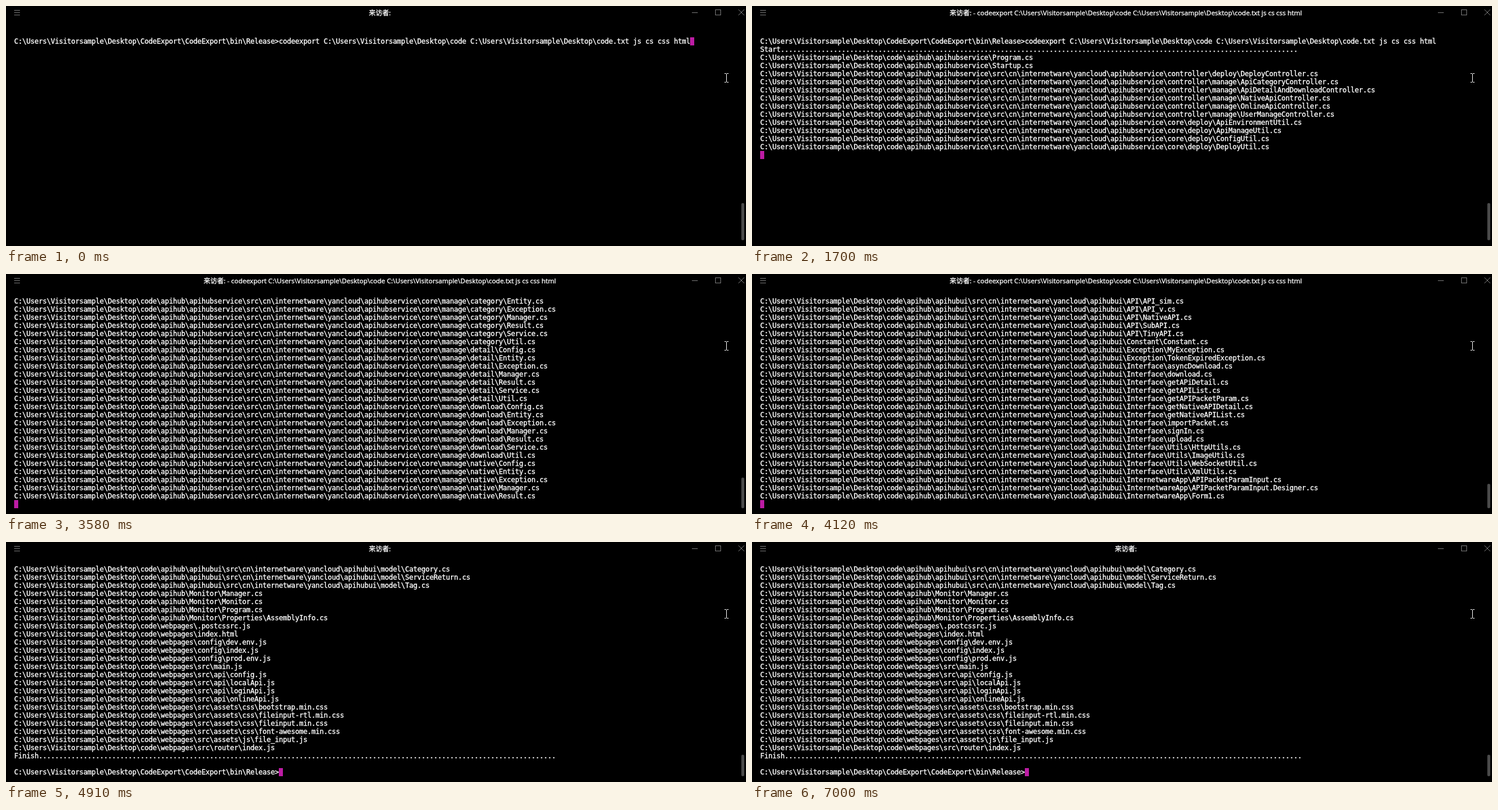
An HTML page with a canvas that plays this animation: 1272 px wide and 414 px high, repeating every 7.05 s.

```html
<!DOCTYPE html>
<html lang="zh">
<head>
<meta charset="utf-8">
<title>codeexport</title>
<style>
  html, body { margin: 0; width: 100%; height: 100%; overflow: hidden; background: #000; }
  canvas { display: block; }
</style>
</head>
<body>
<canvas id="screen" width="1272" height="414"></canvas>
<script>
const LOOP = 7050, ROWS = 26, ROW_H = 14, CHAR_W = 7, LEFT = 14, TOP = 40;
const TEXT = '#fff', ICON = '#7a7a7a', CURSOR = '#bd1ca4', THUMB = '#4a4a4a';
const ctx = document.getElementById('screen').getContext('2d');

// Paths are written with "/" and shown with "\".
const desktop = 'C:/Users/Visitorsample/Desktop/';
const prompt = desktop + 'CodeExport/CodeExport/bin/Release>';
const command = `codeexport ${desktop}code ${desktop}code.txt js cs css html`;
const files = (dir, names, ext = '.cs') =>
  names.split(' ').map(name => `${desktop}code/${dir}/${name}${ext}`);

const service = 'apihub/apihubservice';
const serviceSrc = service + '/src/cn/internetware/yancloud/apihubservice';
const core = serviceSrc + '/core';
const ui = 'apihub/apihubui';
const uiSrc = ui + '/src/cn/internetware/yancloud/apihubui';
const apiNames = 'API API_sim API_v NativeAPI SubAPI TinyAPI';
const web = 'webpages';

const lines = [
  '',
  prompt + command,
  'Start' + '.'.repeat(127),
  ...files(service, 'Program Startup'),
  ...files(serviceSrc + '/controller/deploy', 'DeployController'),
  ...files(serviceSrc + '/controller/manage', 'ApiCategoryController ApiDetailAndDownloadController ' +
    'NativeApiController OnlineApiController UserManageController'),
  ...files(core + '/deploy', 'ApiEnvironmentUtil ApiManageUtil ConfigUtil DeployUtil Result SystemUtil'),
  ...files(core + '/deploy/config', 'Config'),
  ...files(core + '/deploy/entity', 'DeployConfig'),
  ...files(core + '/deploy/exception', 'ApiEnvironmentNotFoundException ApiRunMesLostException ' +
    'FileProcessException GetDaasHttpsCertException NetworkException'),
  ...files(core + '/manage/API', apiNames),
  ...['category', 'detail', 'download', 'native', 'online', 'user'].flatMap(part =>
    files(`${core}/manage/${part}`, 'Config Entity Exception Manager Result Service Util')),
  ...files(ui, 'Program'),
  ...files(ui + '/Properties', 'AssemblyInfo Resources.Designer Settings.Designer'),
  ...files(uiSrc + '/API', apiNames),
  ...files(uiSrc + '/Constant', 'Constant'),
  ...files(uiSrc + '/Exception', 'MyException TokenExpiredException'),
  ...files(uiSrc + '/Interface', 'asyncDownload download getAPiDetail getAPIList getAPIPacketParam ' +
    'getNativeAPIDetail getNativeAPIList importPacket signIn upload'),
  ...files(uiSrc + '/Interface/Utils', 'HttpUtils ImageUtils WebSocketUtil XmlUtils'),
  ...files(uiSrc + '/InternetwareApp', 'APIPacketParamInput APIPacketParamInput.Designer ' +
    'Form1 Form1.Designer Login Login.Designer'),
  ...files(uiSrc + '/model', 'ApiDetail ApiList Category ServiceReturn Tag'),
  ...files('apihub/Monitor', 'Manager Monitor Program'),
  ...files('apihub/Monitor/Properties', 'AssemblyInfo'),
  ...files(web, '.postcssrc.js index.html', ''),
  ...files(web + '/config', 'dev.env index prod.env', '.js'),
  ...files(web + '/src', 'main', '.js'),
  ...files(web + '/src/api', 'config localApi loginApi onlineApi', '.js'),
  ...files(web + '/src/assets/css', 'bootstrap fileinput-rtl fileinput font-awesome', '.min.css'),
  ...files(web + '/src/assets/js', 'file_input', '.js'),
  ...files(web + '/src/router', 'index', '.js'),
  'Finish' + '.'.repeat(127),
  '',
  prompt
].map(line => line.replaceAll('/', '\\'));

// Bursts of output: start ms, step ms, steps, first and last cursor line.
const bursts = [
  [1000, 70, 10, 2, 15],
  [1790, 205, 2, 16, 18],
  [3160, 40, 1, 25, 33],
  [3300, 110, 1, 41, 48],
  [3580, 90, 6, 56, 102],
  [4250, 67, 3, 109, lines.length - 1]
];

function cursorLine(t) {
  let line = 1;
  for (const [start, step, steps, first, last] of bursts) {
    if (t < start) break;
    const done = Math.min(steps, Math.floor((t - start) / step));
    line = Math.round(first + (last - first) * done / steps);
  }
  return line;
}

function rect(color, x, y, w, h) {
  ctx.fillStyle = color;
  ctx.fillRect(x, y, w, h);
}

// A hairline outline gives the strokes the weight of screen-hinted type.
function drawText(text, x, y) {
  ctx.fillStyle = ctx.strokeStyle = TEXT;
  ctx.lineWidth = 0.35;
  ctx.fillText(text, x, y);
  ctx.strokeText(text, x, y);
}

function drawChrome(title) {
  ctx.font = '11.5px "Open Sans", "Noto Sans CJK SC", "Noto Sans CJK", sans-serif';
  ctx.textAlign = 'center';
  drawText(title, 642.5, 16);

  for (const y of [7, 11, 15]) rect(ICON, 14, y, 10, 1);
  rect(ICON, 1179, 11, 10, 1);
  ctx.strokeStyle = ICON;
  ctx.lineWidth = 1;
  ctx.strokeRect(1219.5, 6.5, 9, 9);
  ctx.beginPath();
  ctx.moveTo(1259, 6); ctx.lineTo(1269, 16);
  ctx.moveTo(1269, 6); ctx.lineTo(1259, 16);
  ctx.stroke();
}

function drawPointer() {
  for (const y of [116, 131]) {
    rect('#fff', 1235, y, 3, 1);
    rect('#fff', 1239, y, 3, 1);
  }
  rect('#fff', 1238, 117, 1, 14);
}

function drawScrollbar(scrolled) {
  const height = 364 * ROWS / (148 + scrolled);
  ctx.fillStyle = THUMB;
  ctx.beginPath();
  ctx.roundRect(1264, 404 - height, 5, height, 2);
  ctx.fill();
}

function drawTerminal(current, idle, scrolled) {
  const rowTop = line => TOP + (line - scrolled) * ROW_H;
  ctx.font = '12px "DejaVu Sans Mono", monospace';
  ctx.textAlign = 'left';
  const end = idle ? current : current - 1;
  for (let i = scrolled; i <= end; i++) {
    [...lines[i]].forEach((char, col) =>
      drawText(char, LEFT + col * CHAR_W, rowTop(i) + 11));
  }
  const column = idle ? lines[current].length : 0;
  rect(CURSOR, LEFT + column * CHAR_W, rowTop(current), CHAR_W, ROW_H);
}

let shown = -1;
function frame(now) {
  const current = cursorLine(now % LOOP);
  if (current !== shown) {
    shown = current;
    const idle = current === 1 || current === lines.length - 1;
    const scrolled = Math.max(0, current - ROWS + 1);
    rect('#000', 0, 0, 1272, 414);
    drawChrome('来访者:' + (idle ? '' : ' - ' + command.replaceAll('/', '\\')));
    drawTerminal(current, idle, scrolled);
    drawScrollbar(scrolled);
    drawPointer();
  }
  requestAnimationFrame(frame);
}
frame(0);
</script>
</body>
</html>
```
